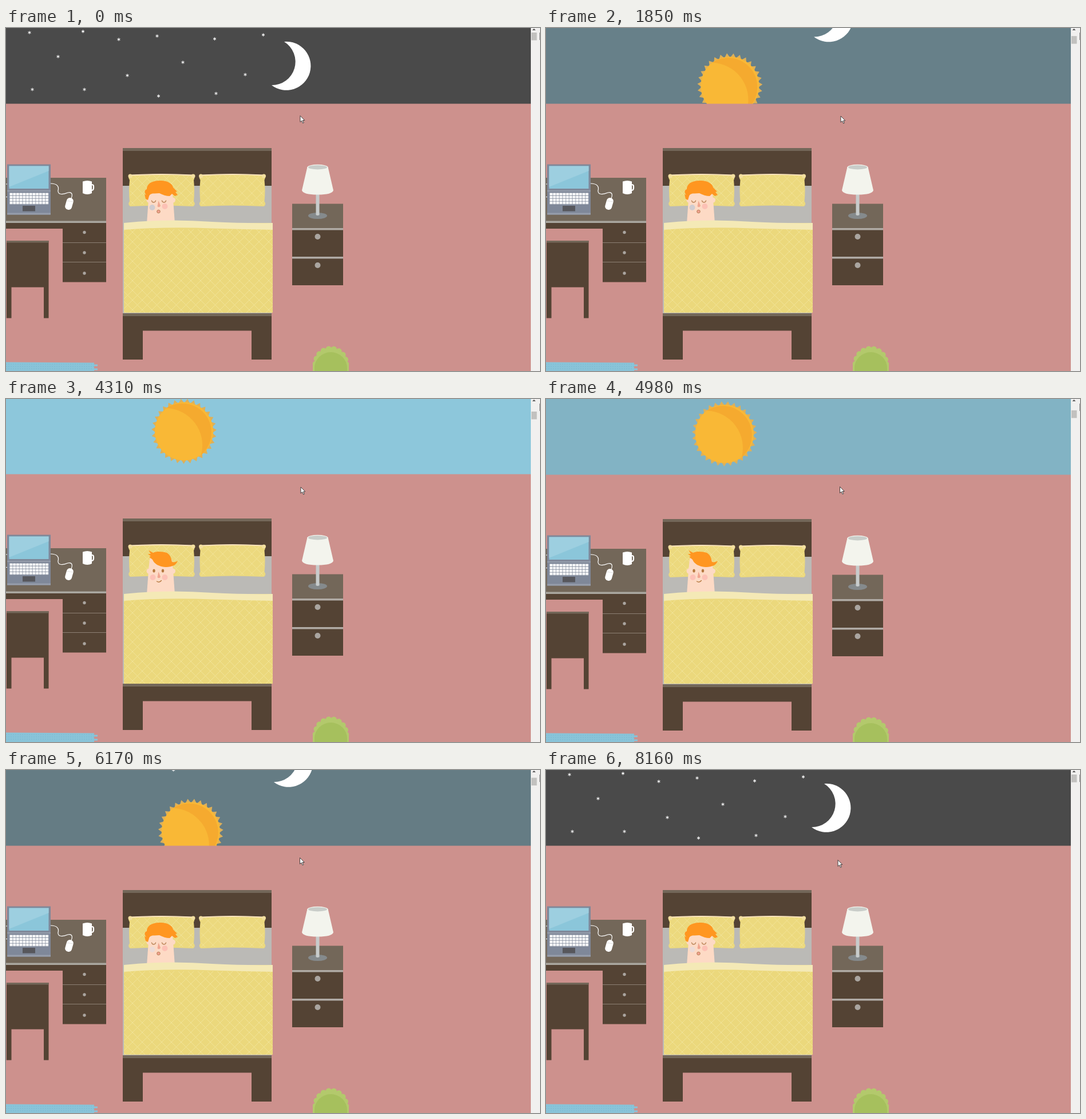
Write an HTML page that moves like this. It is 933 px wide and 600 px high and loops after 9.16 s.

```html
<!DOCTYPE html>
<html lang="en">
<head>
<meta charset="utf-8">
<title>Bedroom at dawn</title>
<style>
html, body { margin: 0; width: 100%; height: 100%; overflow: hidden; background: #cd918d }
svg { display: block }
.dark { fill: #544334 }
.top { fill: #736759 }
.edge { fill: #b0aba5 }
.line { fill: none; stroke-linecap: round }
</style>
</head>
<body>
<svg width="933" height="600" viewBox="0 0 933 600">
  <defs>
    <pattern id="quilt" width="17" height="17" patternUnits="userSpaceOnUse">
      <path d="M0 0L17 17M17 0L0 17" stroke="#f2e49a" stroke-width=".9"/>
    </pattern>
    <pattern id="keys" x="6" y="288" width="5.7" height="5.1" patternUnits="userSpaceOnUse">
      <path d="M.5 .5h4.9v4.2h-4.9z" fill="#fff"/>
    </pattern>
    <path id="star" d="M0-2.8V2.8M-2.5-1.3L2.5 1.3M-2.5 1.3L2.5-1.3" stroke="#fff"/>
    <g id="pillow">
      <path d="M217 257Q272 254 327 257Q331 260 328 266Q330 285 328 303Q332 309 327 312Q272 309 217 312Q212 309 216 303Q214 285 216 266Q212 260 217 257Z" fill="#ecd97e"/>
      <path d="M217 259Q272 256 327 259V310Q272 308 217 310Z" fill="url(#quilt)"/>
      <path class="line" d="M218 257.500Q272 254.500 326 257.500" stroke="#f9e3bd" stroke-width="2"/>
      <g fill="#f3dfa0"><circle cx="217" cy="259" r="3.500"/><circle cx="327" cy="259" r="3.500"/></g>
    </g>
  </defs>

  <g id="page">
    <rect id="sky" width="917" height="140"/>
    <g id="stars"></g>
    <path id="moon" d="M486 24A42.500 42.500 0 1 1 464 100A41 41 0 0 0 486 24Z" fill="#fff"/>
    <g id="sun">
      <path id="rays" fill="#deb058"/>
      <circle r="51" fill="#f9b836"/>
      <path d="M-31-40.500A51 51 0 0 1 30 41A65 65 0 0 0 -31-40.500Z" fill="#f5aa2f"/>
    </g>
    <path d="M0 132.500H917V660H0Z" fill="#cd918d"/>

    <!-- desk -->
    <path class="top" d="M0 262H175V338H0Z"/>
    <path class="dark" d="M0 340H175V444.500H99V351H0Z"/>
    <path d="M0 337.500H175V341H0Z" fill="#aaa7a0"/>
    <path d="M99 375.500H175M99 409.500H175" stroke="#8d8074"/>
    <g fill="#aaa5a0"><circle cx="137" cy="357.500" r="2.700"/><circle cx="137" cy="393" r="2.700"/><circle cx="137" cy="429" r="2.700"/></g>
    <path class="line" d="M0 273H2M0 295.500H2M78 272C89 272 93 277 91 284C90 293 101 291 108 288C115 286 117 291 114 298" stroke="#fff" stroke-width="1.200"/>
    <rect x="104.500" y="297" width="12" height="21" rx="5.500" fill="#fff" transform="rotate(16 110.500 307.500)"/>
    <path d="M106 302L117 304" stroke="#d7d5d2" stroke-width=".7"/>
    <path class="line" d="M149 274H150Q153 274 153 277V280Q153 284 149 284" stroke="#fff" stroke-width="2.200"/>
    <path d="M134 268.500Q142 265.500 150 268.500V289Q142 293 134 289Z" fill="#fff"/>
    <path d="M2 238.500H78V326.500H2Z" fill="#7f8899"/>
    <path d="M5.500 241.500H74.500V281H5.500Z" fill="#8bc6da"/>
    <path d="M5.500 241.500H74.500V250L5.500 278Z" fill="#9dcfe0"/>
    <path d="M2 284H78V286H2ZM2 323.500H78V326.500H2Z" fill="#969dab"/>
    <path d="M6 288H74.400V308.400H6Z" fill="url(#keys)"/>
    <path d="M29 311H51V320.500H29Z" fill="#57575c"/>

    <!-- chair and rug -->
    <path class="dark" d="M1 372H74.500V507.500H66V453.500H9.500V507.500H1Z"/>
    <path class="top" d="M1 372H74.500V375.500H1Z"/>
    <path d="M0 584.500L154 585.500V660H0Z" fill="#89c4d9"/>
    <path d="M0 588H154M0 592H154M0 596H154" stroke="#7db9d0" stroke-dasharray="2 2"/>
    <path d="M152 590H160M152 597H160M152 604H160M152 611H160M152 618H160" stroke="#89c4d9" stroke-width="3"/>

    <!-- bed -->
    <path class="dark" d="M204 210H464V276H204Z"/>
    <path class="top" d="M204 210H464V215H204Z"/>
    <path d="M204 276H464V500H204Z" fill="#bbbab6"/>
    <use href="#pillow"/><use href="#pillow" x="123.500"/>
    <path class="dark" d="M204 499H464V580H429V529.500H239V580H204Z"/>
    <path class="top" d="M204 499H464V504H204Z"/>

    <!-- nightstand and lamp -->
    <path class="top" d="M500 307.500H589V352H500Z"/>
    <path class="dark" d="M500 352H589V450H500Z"/>
    <path class="edge" d="M500 350H589V353.500H500ZM500 400H589V403.500H500Z"/>
    <g fill="#aaa5a0"><circle cx="544.500" cy="365" r="5"/><circle cx="544.500" cy="415" r="5"/></g>
    <ellipse cx="544.500" cy="328.500" rx="16.500" ry="5.500" fill="#858a8c"/>
    <path d="M541.500 288H547.500V327Q544.500 329 541.500 327Z" fill="#c7cbcb"/>
    <path d="M526.500 243L517 284Q519 291.500 544.500 291.500T572 284L562.500 243Z" fill="#f3f4ed"/>
    <ellipse cx="544.500" cy="243.500" rx="18" ry="4.700" fill="#f3f4ed"/>
    <ellipse cx="544.500" cy="243.700" rx="16.500" ry="3.700" fill="#c9cdc9"/>

    <!-- plant -->
    <circle cx="567.500" cy="588" r="27" fill="#b3c96c"/>
    <circle class="line" cx="567.500" cy="588" r="26.500" stroke="#b3c96c" stroke-width="10.500" stroke-dasharray="0 9.250"/>
    <path d="M536 588H599V660H536Z" fill="#b3c96c"/>
    <path d="M539 660V595A28.500 28 0 0 1 596 595V660Z" fill="#a6c05d"/>
  </g>

  <!-- sleeper and blanket -->
  <g fill="#fddac5">
    <circle cx="250" cy="301" r="4.500"/><circle cx="291.500" cy="301" r="4.500"/>
    <path d="M249 300L251 280Q268 266 290 281L292 300L295 342H246Z"/>
  </g>
  <circle cx="277.500" cy="312" r="5" fill="#fcc1b5"/>
  <path d="M266.500 302L264.500 312Q268 315 270 311Z" fill="#f0a690"/>
  <g id="asleep">
    <circle id="breath" cx="255.500" cy="314" r="5"/>
    <path class="line" d="M254.500 302Q255 305 258 305T261.500 302M272.500 302Q273 305 276 305T279.500 302" stroke="#b98355" stroke-width="1.300"/>
    <circle cx="266.500" cy="321" r="2.800" fill="#ef9f8d" stroke="#b98355"/>
    <path d="M244 299L242 291L245 292C241 287 242 283 246 282C246 272 256 267 268 267C281 266 291 272 292 279L299 286L296 287L300 292L295 294L290 290L286 294C280 294 274 292 268 289C258 290 252 288 250 294L248 301Z" fill="#ff9620"/>
  </g>
  <g id="awake">
    <circle cx="256.500" cy="312" r="5" fill="#fcc1b5"/>
    <g fill="#b5793f"><ellipse cx="258.500" cy="300.500" rx="2.200" ry="3"/><ellipse cx="274" cy="300.500" rx="2.200" ry="3"/></g>
    <path class="line" d="M263.500 319Q268 322 271.500 317.500" stroke="#b5793f" stroke-width="1.300"/>
    <path d="M249 264.500L257 269C263 266 274 267 281 269C288 273 289 280 290 285C294 286 297 285 300 283C298 288 295 291 291 292C285 294 281 294 278 294C268 293 259 289 256 281L250 276L253 275L248 271L253 271Z" fill="#ff9620"/>
  </g>
  <path d="M206 341H466V498H206Z" fill="#ebd87c"/>
  <path d="M206 352H466V498H206Z" fill="url(#quilt)"/>
  <path d="M206 341Q280 333 360 339Q420 342 466 341V353Q420 352 360 350.500Q280 347 206 353Z" fill="#f4e9b6"/>

  <!-- scrollbar and pointer -->
  <path d="M917 0H933V600H917Z" fill="#f1f0ef"/>
  <path d="M919.500 4L922.500 1L925.500 4Z" fill="#555"/>
  <rect id="thumb" x="918" width="9.500" height="13.500" fill="#c2c1bf"/>
  <path d="M932.500 8V21" stroke="#8a8a8a"/>
  <path id="pointer" d="M0 0V11L2.600 8.600L4.600 13L6.300 12.200L4.400 8H7.800Z" fill="#fff" stroke="#333" stroke-width=".9"/>
</svg>
<script>
const LOOP = 9160;
const $ = id => document.getElementById(id);
const mix = (a, b, u) => a + (b - a) * u;
const move = (id, x, y) => $(id).setAttribute('transform', `translate(${x} ${y})`);

// wheel turns: first change, last change, number of steps, scroll reached
const turns = [
  [330, 460, 3, .103], [720, 920, 4, .204], [1120, 1250, 3, .32], [1520, 1650, 3, .415],
  [1850, 2120, 5, .612], [2320, 2450, 3, .755], [2650, 2850, 4, .896], [3050, 3250, 4, 1.026],
  [4310, 4450, 3, .93], [4710, 5110, 7, .82], [5250, 5510, 5, .616], [5780, 5970, 4, .42],
  [6170, 6430, 5, .204], [6720, 7100, 7, 0]
];
const night = [74, 74, 74], day = [141, 199, 219];
const starSpots = [[41, 8], [134.5, 6], [197, 20], [264, 14], [364.5, 19], [449.5, 12], [91, 50],
  [309, 60], [212, 83], [418, 81.5], [46, 107.5], [137, 107.5], [266.5, 119], [367, 114.5]];

$('stars').innerHTML = starSpots.map(([x, y]) => `<use href="#star" x="${x}" y="${y}"/>`).join('');

const RAYS = 31;
$('rays').setAttribute('d', 'M' + Array.from({ length: RAYS * 2 }, (_, i) => {
  const angle = (i / RAYS - .52) * Math.PI - .03, r = i % 2 ? 49.5 : 57;
  return [r * Math.cos(angle * 1), r * Math.sin(angle)].map(v => v.toFixed(1));
}).join('L') + 'Z');

function scrollAt(t) {
  let q = 0;
  for (const [start, end, steps, target] of turns) {
    if (t < start) break;
    const step = Math.floor((t - start) / (end - start) * (steps - 1) + .25);
    const u = Math.min(1, (step + 1) / steps);
    q = mix(q, target, u * u * (3 - 2 * u));
  }
  return q;
}

function pointerAt(t) {
  if (t < 395) return [514, 153.5];
  if (t < 4900) return [515, 154];
  if (t < 6950) return [513.5, 153.5];
  const u = Math.min(1, Math.max(0, (t - 7850) / 310));
  return [mix(512.5, 510, u), mix(156.5, 157.5, u)];
}

function draw() {
  const t = performance.now() % LOOP;
  const scroll = scrollAt(t), q = Math.min(1, scroll);
  const rise = 1 - (1 - q) ** 2;
  const isAwake = q > .82;

  $('sky').setAttribute('fill', `rgb(${night.map((c, i) => Math.round(mix(c, day[i], q)))})`);
  move('stars', 41 * rise, -187 * rise);
  move('moon', 6 * rise, -124 * rise);
  move('sun', 343.5 - 32.5 * rise, 194.5 - 137 * rise);
  move('page', 0, -Math.round((scroll - q) * 950));
  $('awake').style.display = isAwake ? '' : 'none';
  $('asleep').style.display = isAwake ? 'none' : '';
  $('breath').setAttribute('fill', t < 4000 ? '#d0cccf' : '#ecdbd6');
  $('thumb').setAttribute('y', 8 + 14 * scroll);
  move('pointer', ...pointerAt(t));
  requestAnimationFrame(draw);
}
draw();
</script>
</body>
</html>
```
